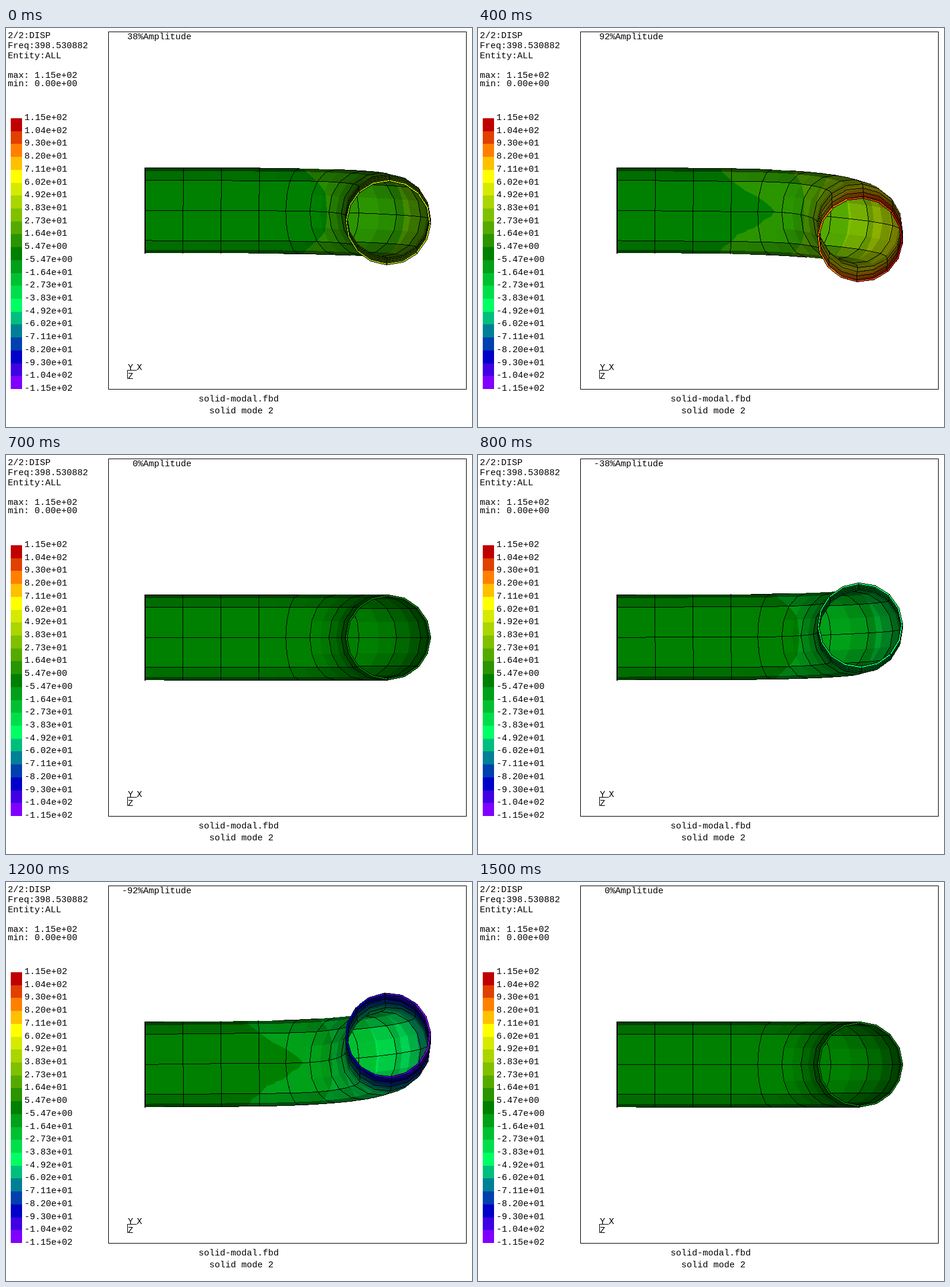
An HTML page with a canvas that plays this animation: 784x672 px, repeating every 1600 ms.

```html
<!DOCTYPE html>
<html lang="en">
<head>
<meta charset="utf-8">
<title>Pipe elbow mode shape</title>
<style>
  html, body { margin: 0; width: 100%; height: 100%; overflow: hidden; background: #fff; }
  canvas { display: block; }
</style>
</head>
<body>
<canvas id="stage" width="784" height="672"></canvas>
<script>
const W = 784, H = 672;
const ctx = document.getElementById('stage').getContext('2d');
const STEPS = 16, STEP_MS = 100;
const MAX = 114.84, BANDS = 21;

// Colour scale: [band, r, g, b], linear in between
const KEYS = [
  [0, 192, 0, 0], [2, 255, 128, 0], [4, 255, 255, 0], [10, 0, 128, 0],
  [14, 0, 255, 100], [18, 0, 0, 200], [20, 128, 0, 255]
];
const palette = Array.from({ length: BANDS }, (_, i) => {
  const n = Math.max(1, KEYS.findIndex(k => k[0] >= i));
  const a = KEYS[n - 1], b = KEYS[n], f = (i - a[0]) / (b[0] - a[0]);
  return [1, 2, 3].map(c => Math.round(a[c] + (b[c] - a[c]) * f));
});

// Pipe: straight run, 90 degree bend towards the viewer, straight run
const X0 = 233.55, Y0 = 306.7, RUN = 191.8, BEND = 217, R_OUT = 71.8, R_IN = 69;
const ARC = BEND * Math.PI / 2, LENGTH = RUN + ARC + RUN, TIP = RUN + BEND;
const AROUND = 16, TIP_SHIFT = 52.5, BEND_SOFTNESS = 5.5;

function axis(s) {
  if (s <= RUN) return { x: s, z: 0, th: 0 };
  if (s >= RUN + ARC) return { x: TIP, z: BEND + s - RUN - ARC, th: Math.PI / 2 };
  const th = (s - RUN) / BEND;
  return { x: RUN + BEND * Math.sin(th), z: BEND * (1 - Math.cos(th)), th };
}

const marks = [0];
for (const [len, n] of [[RUN, 6], [ARC, 10], [RUN, 6]]) {
  const from = marks[marks.length - 1];
  for (let i = 1; i <= n; i++) marks.push(from + len * i / n);
}

// Cantilever under a tip force: bending, torsion and a softer bend
function solveBeam() {
  let v = 0, wz = 0, wx = 0;
  const out = [{ v, wz, wx }], SUB = 40;
  for (let i = 1; i < marks.length; i++) {
    const ds = (marks[i] - marks[i - 1]) / SUB;
    for (let k = 0; k < SUB; k++) {
      const s = marks[i - 1] + (k + 0.5) * ds, p = axis(s);
      const c = Math.cos(p.th), n = Math.sin(p.th);
      const dx = TIP - p.x, dz = TIP - p.z;
      const soft = s > RUN && s < RUN + ARC ? BEND_SOFTNESS : 1;
      const bend = soft * (dx * c + dz * n), twist = 1.3 * (dz * c - dx * n);
      wz += (bend * c - twist * n) * ds;
      wx += (bend * n + twist * c) * ds;
      v += (wz * c + wx * n) * ds;
    }
    out.push({ v, wz, wx });
  }
  const g = TIP_SHIFT / v;
  return out.map(o => ({ v: o.v * g, wz: o.wz * g, wx: o.wx * g }));
}

const beam = solveBeam();

function makeNode(i, j, r) {
  const s = marks[i], p = axis(s), m = beam[i];
  const phi = j * 2 * Math.PI / AROUND;
  const sn = Math.sin(p.th), cs = Math.cos(p.th);
  const rad = r * Math.cos(phi), b = r * Math.sin(phi);
  const a = rad * sn, c = -rad * cs;
  const oval = 0.073 * Math.exp(-(((s - LENGTH / 2 - 8) / 150) ** 2));
  const ux = -m.wz * b + oval * b * sn;
  const uy = m.v + m.wz * a + m.wx * c + oval * rad;
  const uz = -m.wx * b - oval * b * cs;
  return { x0: X0 + p.x + a, y0: Y0 + b, z0: p.z + c, ux, uy, uz, mag: Math.hypot(ux, uy, uz) };
}

const makeSkin = r => marks.map((_, i) =>
  Array.from({ length: AROUND }, (_, j) => makeNode(i, j, r)));
const outer = makeSkin(R_OUT), inner = makeSkin(R_IN);
const nodes = [outer, inner].flat(2);
const peak = Math.max(...nodes.map(n => n.mag));
const last = marks.length - 1;

const tris = [], edges = [];
function addQuad(a, b, c, d, sign) {
  tris.push([a, b, c, sign], [c, b, d, sign]);
}
[[outer, -1], [inner, 1]].forEach(([skin, sign]) => {
  for (let i = 0; i <= last; i++) for (let j = 0; j < AROUND; j++) {
    const k = (j + 1) % AROUND;
    if (i < last) {
      addQuad(skin[i][j], skin[i + 1][j], skin[i][k], skin[i + 1][k], sign);
      if (j % 2 === 0) edges.push([skin[i][j], skin[i + 1][j], false]);
    }
    if (i % 2 === 0) edges.push([skin[i][j], skin[i][k], i === last]);
  }
});
for (let j = 0; j < AROUND; j++) {
  const k = (j + 1) % AROUND, o = outer[last], n = inner[last];
  addQuad(o[j], o[k], n[j], n[k], 1);
  if (j % 2 === 0) edges.push([o[j], n[j], true]);
}

const image = ctx.createImageData(W, H);
const pixels = new Uint32Array(image.data.buffer);
const depth = new Float32Array(W * H);
const BLACK = 0xff000000;

function fillTri([a, b, c, sign], amp) {
  const e1x = b.x - a.x, e1y = b.y - a.y, e1z = b.z - a.z;
  const e2x = c.x - a.x, e2y = c.y - a.y, e2z = c.z - a.z;
  const area = e1x * e2y - e1y * e2x;
  const size = Math.hypot(e1y * e2z - e1z * e2y, e1z * e2x - e1x * e2z, area);
  const nz = sign * area / size;
  for (const n of [a, b, c]) n.nz += nz;
  if (nz < 1e-4) return;

  const light = Math.min(1, 0.3 + nz);
  const shades = palette.map(([r, g, bl]) =>
    (BLACK | (bl * light) << 16 | (g * light) << 8 | (r * light)) >>> 0);
  const left = Math.ceil(Math.min(a.x, b.x, c.x)), right = Math.floor(Math.max(a.x, b.x, c.x));
  const top = Math.ceil(Math.min(a.y, b.y, c.y)), bottom = Math.floor(Math.max(a.y, b.y, c.y));
  for (let y = top; y <= bottom; y++) for (let x = left; x <= right; x++) {
    const px = x - a.x, py = y - a.y;
    const u = (px * e2y - py * e2x) / area, w = (e1x * py - e1y * px) / area;
    if (u < -1e-6 || w < -1e-6 || u + w > 1 + 1e-6) continue;
    const z = a.z + u * e1z + w * e2z, at = y * W + x;
    if (z <= depth[at]) continue;
    depth[at] = z;
    const value = amp * (a.mag + u * (b.mag - a.mag) + w * (c.mag - a.mag)) / peak;
    const band = Math.floor((1 - value) / 2 * BANDS);
    pixels[at] = shades[Math.max(0, Math.min(BANDS - 1, band))];
  }
}

function drawEdge([a, b, always]) {
  if (!always && a.nz + b.nz < -0.02) return;
  const dx = b.x - a.x, dy = b.y - a.y;
  const n = Math.max(1, Math.ceil(Math.max(Math.abs(dx), Math.abs(dy))));
  for (let i = 0; i <= n; i++) {
    const f = i / n;
    const at = Math.round(a.y + dy * f) * W + Math.round(a.x + dx * f);
    if (a.z + (b.z - a.z) * f + 6 >= depth[at]) pixels[at] = BLACK;
  }
}

function drawPipe(amp) {
  pixels.fill(0xffffffff);
  depth.fill(-1e9);
  for (const n of nodes) {
    n.x = n.x0 + amp * n.ux;
    n.y = n.y0 + amp * n.uy;
    n.z = n.z0 + amp * n.uz;
    n.nz = 0;
  }
  tris.forEach(t => fillTri(t, amp));
  edges.forEach(drawEdge);
  ctx.putImageData(image, 0, 0);
  // Clamped end
  ctx.fillStyle = '#000';
  ctx.fillRect(233, 235, 2, 145);
}

function scientific(v) {
  return v.toExponential(2).replace(/(\d)$/, '0$1');
}

function drawLabels(amp) {
  ctx.font = '15px "Liberation Mono", monospace';
  const put = (text, x, y) => ctx.fillText(text, x, y);

  palette.forEach((c, i) => {
    const top = Math.round(152 + i * 456 / BANDS), end = Math.round(152 + (i + 1) * 456 / BANDS);
    ctx.fillStyle = `rgb(${c})`;
    ctx.fillRect(8, top, 19, end - top);
  });

  ctx.fillStyle = '#000';
  for (let i = 0; i <= BANDS; i++) {
    put(scientific(MAX * (1 - 2 * i / BANDS)), 31, Math.round(155 + i * 456 / BANDS));
  }
  put('2/2:DISP', 3, 17);
  put('Freq:398.530882', 3, 34);
  put('Entity:ALL', 3, 51);
  put('max: ' + scientific(MAX), 3, 84);
  put('min: 0.00e+00', 3, 98);
  put('solid-modal.fbd', 324, 629);
  put('solid mode 2', 342, 649);

  const label = Math.trunc(amp * 100 + Math.sign(amp) * 1e-6) + '%Amplitude';
  put(label, 312 - 9 * label.length, 19);

  put('Y', 205, 576);
  put('X', 220, 576);
  put('Z', 205, 591);
  ctx.fillRect(204, 576, 16, 1);
  ctx.fillRect(204, 576, 1, 15);

  ctx.strokeStyle = '#000';
  ctx.lineWidth = 1;
  ctx.strokeRect(172.5, 6.5, 602, 602);
}

const start = performance.now();
let shown = -1;
function tick() {
  const step = Math.floor((performance.now() - start) / STEP_MS) % STEPS;
  if (step !== shown) {
    shown = step;
    const amp = Math.sin((step + 1) * 2 * Math.PI / STEPS);
    drawPipe(amp);
    drawLabels(amp);
  }
  requestAnimationFrame(tick);
}
tick();
</script>
</body>
</html>
```
